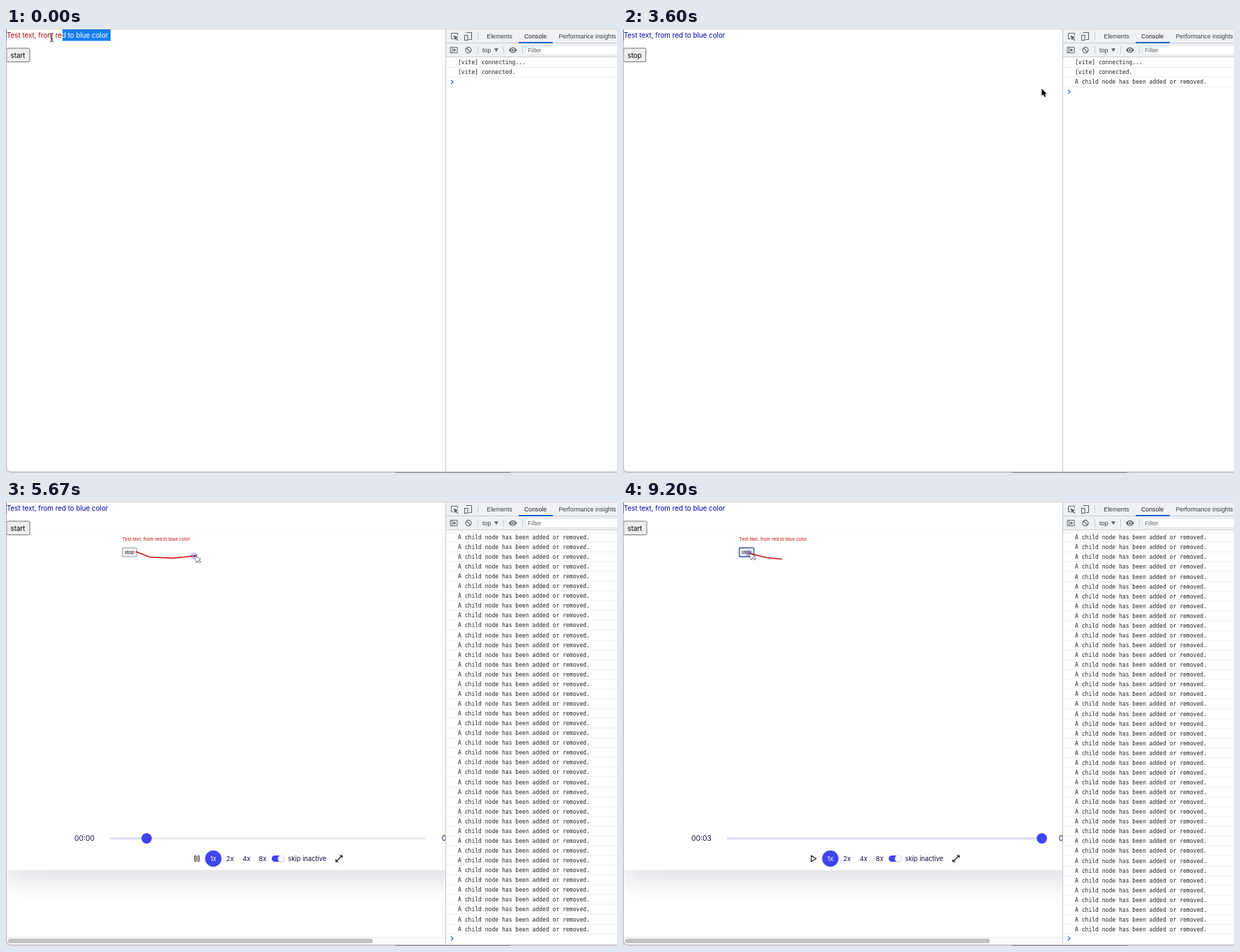
Write an HTML page with a canvas that moves like this. It is 876 by 639 pixels and loops after 9.34 s.

```html
<!DOCTYPE html>
<html lang="en">
<head>
<meta charset="utf-8">
<title>Recorder demo</title>
<style>
html, body { margin: 0; width: 100%; height: 100%; overflow: hidden; background: #fff; }
canvas { display: block; }
</style>
</head>
<body>
<canvas id="stage" width="876" height="639"></canvas>
<script>
const ctx = document.getElementById('stage').getContext('2d');
const LOOP = 9340, STEP = 1000 / 15;
const PANEL = 631;
const STARTED = 1540, STOPPED = 5250, REPLAY = 5257, LENGTH = 3536;
const LEFT_PAGE = 3612, CAME_BACK = 4713;
const UI = '"Liberation Sans", Arial, sans-serif';
const INTER = 'Inter, sans-serif';
const MONO = '"DejaVu Sans Mono", monospace';
const TITLE = 'Test text, from red to blue color';
const LOG = 'A child node has been added or removed.';
const RED = '#b80000', BLUE = '#0000aa', ACCENT = '#4045f0';

// pointer waypoints: time, x, y
const PATH = [
  [0, 65, 13], [200, 5, 12], [450, 3, 12], [700, 60, 50], [950, 50, 60],
  [1250, 24, 41], [1640, 28, 38], [1700, 30, 37], [1780, 61, 49], [1860, 111, 51],
  [1915, 158, 46], [1953, 162, 43.5], [2150, 285, 44], [2450, 200, 20], [2600, 150, 11],
  [2850, 2, 10], [2930, 2, 10], [3080, 70, 33], [3200, 123, 48], [3230, 132, 48],
  [3270, 136, 52], [3340, 178, 64], [3375, 225, 66], [3413, 318, 70], [3600, 600, 87],
  [3800, 830, 80], [3950, 800, 78], [4400, 673, 78], [4600, 673, 78], [4700, 640, 108],
  [5000, 60, 50], [5060, 21, 40], [5090, 21, 40], [5190, 27, 44], [5300, 27, 44]
];

function pointerAt(t) {
  const i = PATH.findIndex(p => p[0] > t);
  if (i < 1) return PATH[PATH.length - 1].slice(1);
  const [t0, x0, y0] = PATH[i - 1], [t1, x1, y1] = PATH[i];
  const k = (t - t0) / (t1 - t0);
  return [x0 + (x1 - x0) * k, y0 + (y1 - y0) * k];
}

function replayPointer(s) {
  if (s > LEFT_PAGE && s < CAME_BACK) s = LEFT_PAGE;
  const [x, y] = pointerAt(Math.max(s, 1700));
  return [166 + x * 0.667, 48 + y * 0.667];
}

function rect(x, y, w, h, color) {
  ctx.fillStyle = color;
  ctx.fillRect(x, y, w, h);
}

function pill(x, y, w, h, r, fill, stroke, width = 1) {
  ctx.beginPath();
  ctx.roundRect(x, y, w, h, r);
  if (fill) { ctx.fillStyle = fill; ctx.fill(); }
  if (stroke) { ctx.strokeStyle = stroke; ctx.lineWidth = width; ctx.stroke(); }
}

function disc(x, y, r, fill) {
  ctx.beginPath();
  ctx.arc(x, y, r, 0, 7);
  ctx.fillStyle = fill;
  ctx.fill();
}

function text(str, x, y, size, family, color = '#000') {
  ctx.font = `${size}px ${family}`;
  ctx.fillStyle = color;
  ctx.fillText(str, x, y);
}

function shape(d, x, y, fill, stroke, width = 1) {
  ctx.save();
  ctx.translate(x, y);
  const p = new Path2D(d);
  if (stroke) { ctx.strokeStyle = stroke; ctx.lineWidth = width; ctx.stroke(p); }
  if (fill) { ctx.fillStyle = fill; ctx.fill(p); }
  ctx.restore();
}

function clipped(x, y, w, h, draw) {
  ctx.save();
  ctx.beginPath();
  ctx.rect(x, y, w, h);
  ctx.clip();
  draw();
  ctx.restore();
}

function drawPage(t) {
  const recording = t >= STARTED && t < STOPPED;
  text(TITLE, 1, 14, 9.8, INTER, t < STARTED ? RED : BLUE);
  let left = 150;
  if (t < 500) left = Math.max(1, 81 - 0.4 * t);
  else if (t > 2600 && t < 2980) left = pointerAt(t)[0];
  if (left < 150) {
    clipped(left, 2, 150 - left, 16.5, () => {
      rect(0, 2, 150, 17, '#1780f3');
      text(TITLE, 1, 14, 9.8, INTER, '#fff');
    });
  }
  pill(0.8, 29, recording ? 31.9 : 33.2, 19.6, 1.8, '#efefef', '#707070', 1);
  text(recording ? 'stop' : 'start', 6.5, 42.5, 9.8, INTER);
}

function drawFrame() {
  rect(0, 0, 876, 1, '#f4f4f4');
  rect(0, 1, 876, 1, '#cfcfcf');
  rect(0, 2, 1, 16, '#777');
  rect(0, 18, 1, 614, '#b5b5b5');
  shape('M0 630 Q.5 637.5 8 637.5 L0 639 Z', 0, 0, '#dcdcdc');
  shape('M.5 630 Q.5 637.5 8 637.5 H876', 0, 0, null, '#adadad');
  rect(4, 638, 872, 1, '#dedede');
  rect(558, 638, 165, 1, '#999');
}

function drawReplay(t) {
  const r = Math.min(t - REPLAY, LENGTH);
  const playing = t - REPLAY < LENGTH;
  const s = STARTED + r;

  ctx.save();
  ctx.shadowColor = 'rgba(17,16,62,.12)';
  ctx.shadowBlur = 35;
  ctx.shadowOffsetY = 17.5;
  rect(1, 49, 752, 481, '#fff');
  ctx.restore();

  // recorded document
  text(TITLE, 166.7, 57.3, 6.54, INTER, RED);
  const focused = s > 5000;
  pill(166.7, 67.2, 21, 12.8, 1.3, '#efefef', focused ? '#2f5f9e' : '#808080', focused ? 1.4 : 0.8);
  text('stop', 170.3, 76.2, 6.54, INTER);

  // trail of the last half second
  const tail = Math.max(STARTED + t - REPLAY - 500, 1700);
  if (tail < s) {
    ctx.beginPath();
    for (let u = tail; u < s; u += 6) ctx.lineTo(...replayPointer(u));
    ctx.lineTo(...replayPointer(s));
    ctx.strokeStyle = '#d01010';
    ctx.lineWidth = 1.6;
    ctx.lineJoin = 'round';
    ctx.stroke();
  }
  const [x, y] = replayPointer(playing ? s - 38 : s);
  disc(x, y, 5, 'rgba(73,80,246,.32)');
  shape('M0 0 L3 8.5 L4.6 5.7 L7.6 8.8 L8.9 7.5 L5.8 4.5 L8.5 3.1 Z', x + 0.8, y + 1, '#fff', '#333', 1.2);

  // timeline
  const knob = Math.min(149 + 454 * r / LENGTH, 600.5);
  text(`00:0${Math.floor(r / 1000)}`, 98, 488, 10.3, INTER, '#11103e');
  text('00:03', 624.7, 488, 10.3, INTER, '#11103e');
  rect(149, 483, 454, 3, '#ececf0');
  rect(149, 483, knob - 149, 3, '#dadaf7');
  disc(knob, 484.5, 7.4, ACCENT);

  // controls
  if (playing) {
    pill(270.5, 509.2, 2.1, 8.6, 0.9, null, '#222', 1);
    pill(275, 509.2, 2.1, 8.6, 0.9, null, '#222', 1);
  } else {
    shape('M0 0 L7 4.4 L0 8.8 Z', 270, 509.2, null, '#111', 1.2);
  }
  disc(297.2, 513.5, 11.7, ACCENT);
  text('1x', 292.7, 517, 9.3, INTER, '#fff');
  ['2x', '4x', '8x'].forEach((label, i) => text(label, 315.8 + i * 23.4, 517, 9.3, INTER, '#11103e'));
  pill(381, 509, 18.5, 9, 4.5, ACCENT);
  disc(394.8, 513.8, 5.2, '#c9c9d4');
  disc(394.8, 513.4, 4.8, '#f6f6f6');
  text('skip inactive', 404.6, 517, 9.3, INTER, '#11103e');
  shape('M0 9 L9 0 M5.5 0 H9 V3.5 M0 5.5 V9 H3.5', 473, 509, null, '#111', 1.2);

  // page scroll bar
  rect(1, 626.5, 630, 10, '#fafafa');
  rect(1, 626, 630, 0.7, '#e8e8e8');
  pill(3, 628.5, 523, 6.4, 3.2, '#c1c1c1');
}

function drawToolbar() {
  const ink = '#5f6368', line = '#c8ccd1';
  rect(PANEL, 2, 245, 40, '#eff1f4');
  rect(PANEL, 21, 245, 1, line);
  rect(PANEL, 41, 245, 1, line);
  rect(735, 20, 49, 2, '#1a67d2');
  text('Elements', 689.3, 15, 8.76, UI, '#3c4043');
  text('Console', 743, 15, 8.76, UI, '#202124');
  text('Performance insights', 792.5, 15, 8.76, UI, '#3c4043');

  shape('M3 8 H0 V0 H9 V3', 638.5, 7.5, null, ink, 1);
  shape('M0 0 L7 2.7 L4.2 4 L7 7 L6 8 L3.3 5 L2 7.3 Z', 641.5, 10.5, ink);
  shape('M3 1 V0 H10 V10 H6 M0 4 H4.5 V11 H0 Z', 657.5, 6.5, null, ink, 1.1);
  rect(676, 6, 1, 11, line);

  shape('M0 0 H10 V8 H0 Z M2.6 0 V8', 637, 27.7, null, ink, 1);
  shape('M0 0 L4 2.5 L0 5 Z', 641.5, 29.2, ink);
  ctx.beginPath();
  ctx.arc(663, 31.7, 4, 0, 7);
  ctx.moveTo(660.2, 28.9);
  ctx.lineTo(665.8, 34.5);
  ctx.strokeStyle = ink;
  ctx.lineWidth = 1.2;
  ctx.stroke();
  [676, 713, 740].forEach(x => rect(x, 26, 1, 11, line));
  text('top', 683, 34.8, 8.9, UI, '#3c4043');
  shape('M0 0 H6 L3 5 Z', 700, 29.3, ink);
  shape('M0 4 Q6 -4 12 4 Q6 12 0 4 Z', 720.8, 27.7, ink);
  disc(726.8, 31.7, 2.7, '#eff1f4');
  disc(726.8, 31.7, 1.5, ink);
  pill(745.5, 25, 140, 13.5, 1, '#fff', '#d9dce0', 0.8);
  text('Filter', 748, 35, 8.76, UI, '#5f6368');
}

function drawLine(str, center) {
  text(str, 648, center + 2.7, 8.05, MONO, '#202124');
  rect(PANEL, center + 6.5, 245, 1, '#ededed');
}

function drawPrompt(center) {
  shape('M0 0 L3 2.7 L0 5.4', 638, center - 2.7, null, '#3569c8', 1.3);
}

function drawConsole(t) {
  rect(PANEL - 1, 2, 246, 635, '#fff');
  rect(PANEL - 1, 2, 1, 635, '#c5c7ca');
  if (t >= REPLAY) {
    const shift = t - REPLAY >= LENGTH ? 0.45 : 0;
    rect(PANEL, 45, 245, 1, '#ededed');
    for (let i = 0; i <= 40; i++) drawLine(LOG, Math.round(51.8 + i * 14.07 + shift));
    drawPrompt(628.2);
  } else {
    if (t > 3950) {
      const chars = Math.max(5, Math.round((pointerAt(t)[0] - 648) / 4.846));
      const left = 648 + chars * 4.846;
      if (left < 798) rect(left, 72, 798.5 - left, 11, '#add3f2');
    }
    const lines = ['[vite] connecting...', '[vite] connected.'];
    if (t >= STARTED) lines.push(LOG);
    lines.forEach((str, i) => drawLine(str, 49.5 + i * 14));
    drawPrompt(49.3 + lines.length * 14.1);
  }
  drawToolbar();
}

function drawPointer(t) {
  const [x, y] = pointerAt(t);
  const onTitle = x < 150 && y < 18;
  const onLog = x > 648 && x < 837 && y > 72 && y < 84;
  if (onTitle || onLog) {
    const beam = 'M-2.5 -6 Q0 -6 0 -4 Q0 -6 2.5 -6 M0 -4 V4 M-2.5 6 Q0 6 0 4 Q0 6 2.5 6 M-1.5 2 H1.5';
    shape(beam, x + 0.5, y + 0.5, null, '#fff', 2.4);
    shape(beam, x + 0.5, y + 0.5, null, '#111', 1);
  } else {
    shape('M0 0 V10.2 L2.4 8 L4 11.6 L5.9 10.8 L4.3 7.3 H7.3 Z', x + 0.3, y + 0.3, '#000', '#fff', 1.6);
  }
}

function draw(now) {
  const clock = now % LOOP;
  const t = Math.min(Math.floor((clock + 4) / STEP) * STEP, 9200);
  rect(0, 0, 876, 639, '#fff');
  if (t >= REPLAY) clipped(0, 2, PANEL - 1, 635, () => drawReplay(t));
  drawPage(t);
  drawConsole(t);
  drawFrame();
  if (t < STOPPED) drawPointer(t);
}

const begin = performance.now();
function tick() {
  draw(performance.now() - begin);
  requestAnimationFrame(tick);
}
tick();
</script>
</body>
</html>
```
